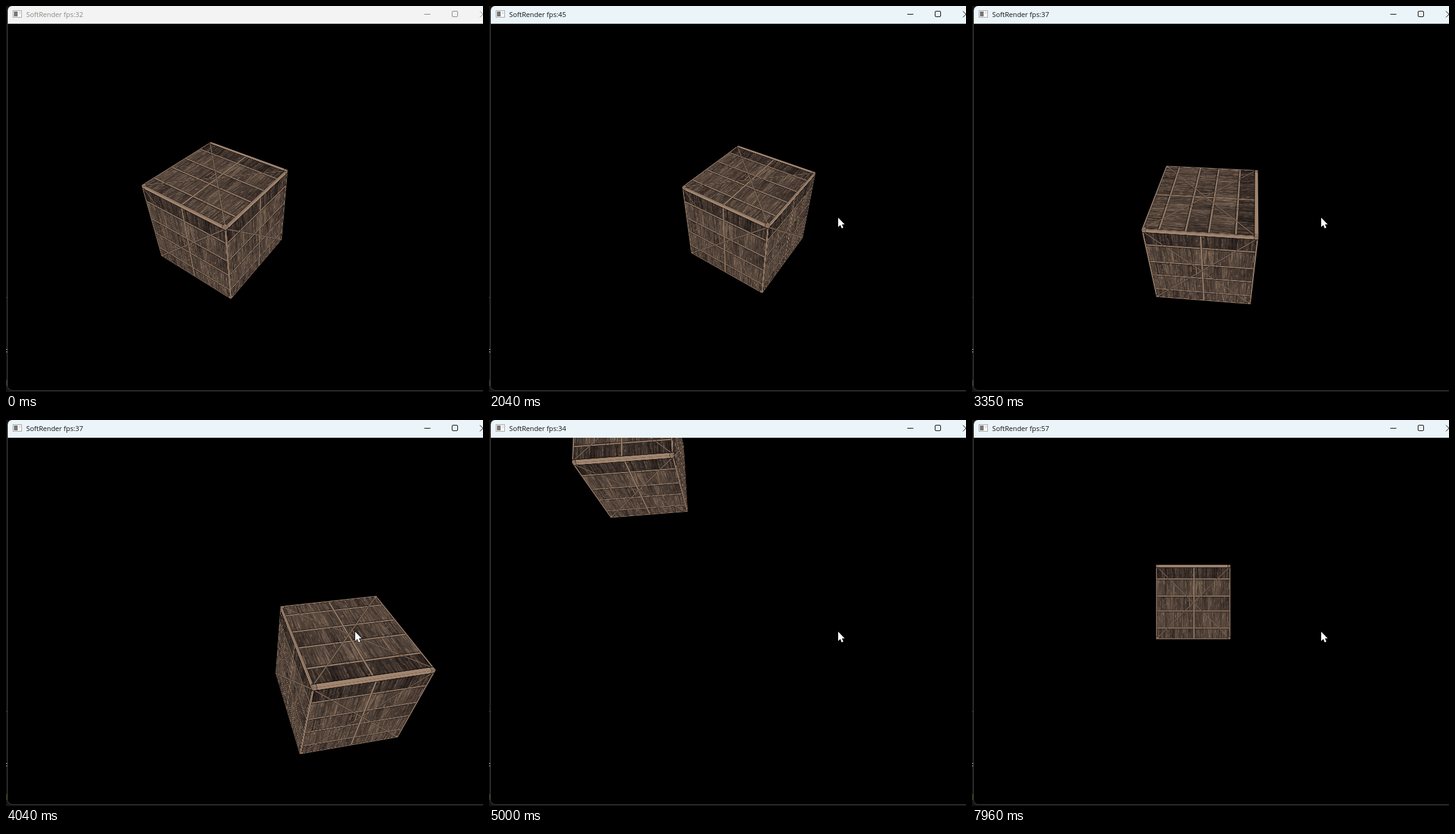
Write an HTML page with a canvas that moves like this. It is 780 px wide and 631 px high and loops after 8 s.

```html
<!DOCTYPE html>
<html lang="en">
<head>
<meta charset="utf-8">
<title>SoftRender</title>
<style>
  html, body { margin: 0; width: 100%; height: 100%; overflow: hidden; background: #000; }
  #stage { position: relative; width: 780px; height: 631px; overflow: hidden; background: #151515; }
  #stage > * { position: absolute; }
  .mark { left: 0; }
  #window { left: 2px; top: 0; width: 801px; height: 629px; box-sizing: border-box; background: #000;
    border: solid #3c3c3c; border-width: 0 0 1px 1px; border-radius: 8px; }
  #bar { left: 3px; top: 0; width: 800px; height: 29px; border-top-left-radius: 7px; }
  #label { left: 33px; top: 5px; font: 11.2px/17px "Open Sans", "Noto Sans", sans-serif; white-space: pre; }
  #view { left: 3px; top: 29px; width: 777px; height: 599px; overflow: hidden;
    border-bottom-left-radius: 7px; perspective: 519.6px; perspective-origin: 400px 300px; }
  #cube { position: absolute; left: 400px; top: 300px; width: 0; height: 0;
    transform-style: preserve-3d; transform-origin: 0 0; }
  #cube canvas { position: absolute; left: -128px; top: -128px; backface-visibility: hidden; }
  svg { left: 0; top: 0; overflow: visible; }
</style>
</head>
<body>
<div id="stage">
  <div class="mark" style="top:476px;width:3px;height:1px;background:#444"></div>
  <div class="mark" style="top:561px;width:2px;height:5px;border:solid #bbb;border-width:1px 0;box-sizing:border-box"></div>
  <div class="mark" id="patch" style="top:611px;width:3px;height:10px"></div>
  <div id="window"></div>
  <div id="view"><div id="cube"></div></div>
  <div id="bar"></div>
  <svg width="780" height="29" fill="none">
    <rect x="11.5" y="7.5" width="14" height="11" fill="#fafafa" stroke="#a5a5a5"/>
    <rect x="13" y="9" width="6" height="8" fill="#777"/>
    <path d="M21 10h3M21 12h3" stroke="#ccc"/>
    <g id="buttons" stroke="currentColor">
      <path d="M684 13.5h10M775 8.5l10 10M785 8.5l-10 10"/>
      <rect x="729.5" y="8.5" width="9" height="9" rx="1.5"/>
    </g>
  </svg>
  <div id="label"></div>
  <svg id="cursor" width="12" height="19">
    <path d="M0 0V15.2L3.5 12 5.8 17.4 8.4 16.3 6.2 11H10.6Z" fill="#fff" stroke="#000" stroke-width="1.4" paint-order="stroke"/>
  </svg>
</div>
<script>
const LOOP = 8000, FOCAL = 519.6, SIDE = 256;
const $ = id => document.getElementById(id);
const lerp = (a, b, k) => a + (b - a) * k;
const clamp01 = k => Math.min(1, Math.max(0, k));

let seed = 7;
const random = () => (seed = seed * 16807 % 2147483647) / 2147483647;
const tone = (k, alpha = 1) =>
  `rgba(${lerp(24, 176, k)},${lerp(19, 146, k)},${lerp(19, 121, k)},${alpha})`;

function crateTexture() {
  const canvas = document.createElement('canvas');
  canvas.width = canvas.height = SIDE;
  const g = canvas.getContext('2d');
  const seams = [0, .19, .42, .62, .85, 1].map(v => v * SIDE);
  const battens = seams.slice(1, 5);

  function plank(x, y, width, height, level) {
    g.fillStyle = tone(level);
    g.fillRect(x, y, width, height);
    for (let i = 0; i < 55; i++) {
      const length = height * (.1 + .6 * random() ** 2);
      const flake = random() < .16 ? .35 : 0;
      g.fillStyle = tone(clamp01(level + (random() - .5) * .35 + flake), .75);
      g.fillRect(x + random() * width, y + random() * (height - length), 1 + random() * 1.6, length);
    }
    g.fillStyle = tone(0, .45);
    g.fillRect(x, y, 1.2, height);
  }
  function beam(x, y, width, height, level = .83) {
    g.fillStyle = 'rgba(12,9,8,.65)';
    g.fillRect(x - 1, y - 1, width + 2, height + 3);
    g.fillStyle = tone(level);
    g.fillRect(x, y, width, height);
  }

  [.18, .4, .33, .4, .34].forEach((level, row) => {
    for (let x = 0; x < SIDE; x += 16)
      plank(x, seams[row], 16, seams[row + 1] - seams[row], level + (random() - .5) * .16);
  });
  battens.forEach(y => beam(0, y - 2, SIDE, 4));
  beam(SIDE * .51 - 2, 0, 4, SIDE);
  for (const from of [0, SIDE])
    for (const [width, color] of [[4, 'rgba(15,11,10,.45)'], [2.4, tone(.7)]]) {
      g.lineWidth = width;
      g.strokeStyle = color;
      g.beginPath();
      g.moveTo(from, 4);
      g.lineTo(SIDE - from, SIDE);
      g.stroke();
    }
  battens.forEach(y => [.18, .65].forEach(u => beam(u * SIDE - 4, y - 3, 8, 6, .7)));
  beam(0, 0, 3, SIDE);
  beam(SIDE - 3, 0, 3, SIDE);
  beam(0, SIDE - 3, SIDE, 3);
  beam(0, 0, SIDE, 8, .9);
  for (const x of [0, SIDE - 8]) for (const y of [0, SIDE - 8]) beam(x, y, 8, 8, .78);
  return canvas;
}

const texture = crateTexture();
['', 'rotateY(90deg)', 'rotateY(180deg)', 'rotateY(270deg)',
 'rotateX(90deg) rotateZ(180deg)', 'rotateX(-90deg)'].forEach(turn => {
  const face = document.createElement('canvas');
  face.width = face.height = SIDE;
  face.getContext('2d').drawImage(texture, 0, 0);
  face.style.transform = `${turn} translateZ(${SIDE / 2}px)`;
  $('cube').append(face);
});

// Cube seen from the camera: angles in degrees, position in cube sides.
const startPose = { yaw: 145.4, pitch: 40.5, x: -.344, y: .091, z: 3.4 };

// Each move eases into new values; a swing bulges the path sideways on the way.
const moves = [
  { from: 800, to: 1150, pose: { z: 4.3 } },
  { from: 1220, to: 1840, pose: { x: .16, z: 3.62 }, swing: { x: .7 } },
  { from: 2440, to: 3350, pose: { yaw: 85, x: -.116, y: .277, z: 3.4 }, swing: { x: .55 } },
  { from: 3350, to: 4040, pose: { yaw: 10, x: .853, y: .498, z: 3.115 }, swing: { x: -.8 } },
  { from: 4110, to: 5000, pose: { yaw: 5, pitch: 77, x: -1.164, y: -1.984, z: 3.758 } },
  { from: 5130, to: 5680, pose: { pitch: 49, x: -.381, y: -.594, z: 4.292 }, swing: { y: .5 } },
  { from: 6470, to: 7030, pose: { yaw: 0, pitch: 23, x: -.34, y: 1.7 }, swing: { y: -2.1 } },
  { from: 7350, to: 7560, pose: { pitch: 0, y: .53, z: 4.777 } },
  { from: 7820, to: 7960, pose: { y: -.259 } }
];

function poseAt(t) {
  const now = { ...startPose };
  for (const { from, to, pose, swing = {} } of moves) {
    const k = clamp01((t - from) / (to - from));
    for (const key in pose) now[key] = lerp(now[key], pose[key], k);
    for (const key in swing) now[key] += swing[key] * Math.sin(Math.PI * k);
  }
  return now;
}

const frameRates = { 0: 32, 2040: 45, 3150: 37, 4190: 34, 5200: 38, 6210: 53, 7220: 57 };

function draw(t) {
  const { yaw, pitch, x, y, z } = poseAt(t);
  $('cube').style.transform = `translate3d(${x * SIDE}px,${y * SIDE}px,${FOCAL - z * SIDE}px)
    rotateX(${-pitch}deg) rotateY(${yaw}deg)`;

  const active = clamp01((t - 400) / 210) * 100;
  const mix = (on, off) => `color-mix(in srgb, ${on} ${active}%, ${off})`;
  $('bar').style.background = mix('#ebf4f8', '#f3f3f3');
  $('label').style.color = mix('#111111', '#8d8880');
  $('buttons').style.color = mix('#000000', '#858585');
  $('patch').style.background = mix('#34361c', '#43301f');
  const latest = Object.keys(frameRates).filter(time => time <= t).pop();
  $('label').textContent = 'SoftRender fps:' + frameRates[latest];

  const k = clamp01((t - 70) / 190);
  $('cursor').style.display = t < 70 ? 'none' : '';
  $('cursor').style.transform = `translate(${lerp(738, 571, k)}px,${lerp(578, 346, k)}px)`;
}

const begin = performance.now();
function tick() {
  draw((performance.now() - begin) % LOOP);
  requestAnimationFrame(tick);
}
tick();
</script>
</body>
</html>
```
